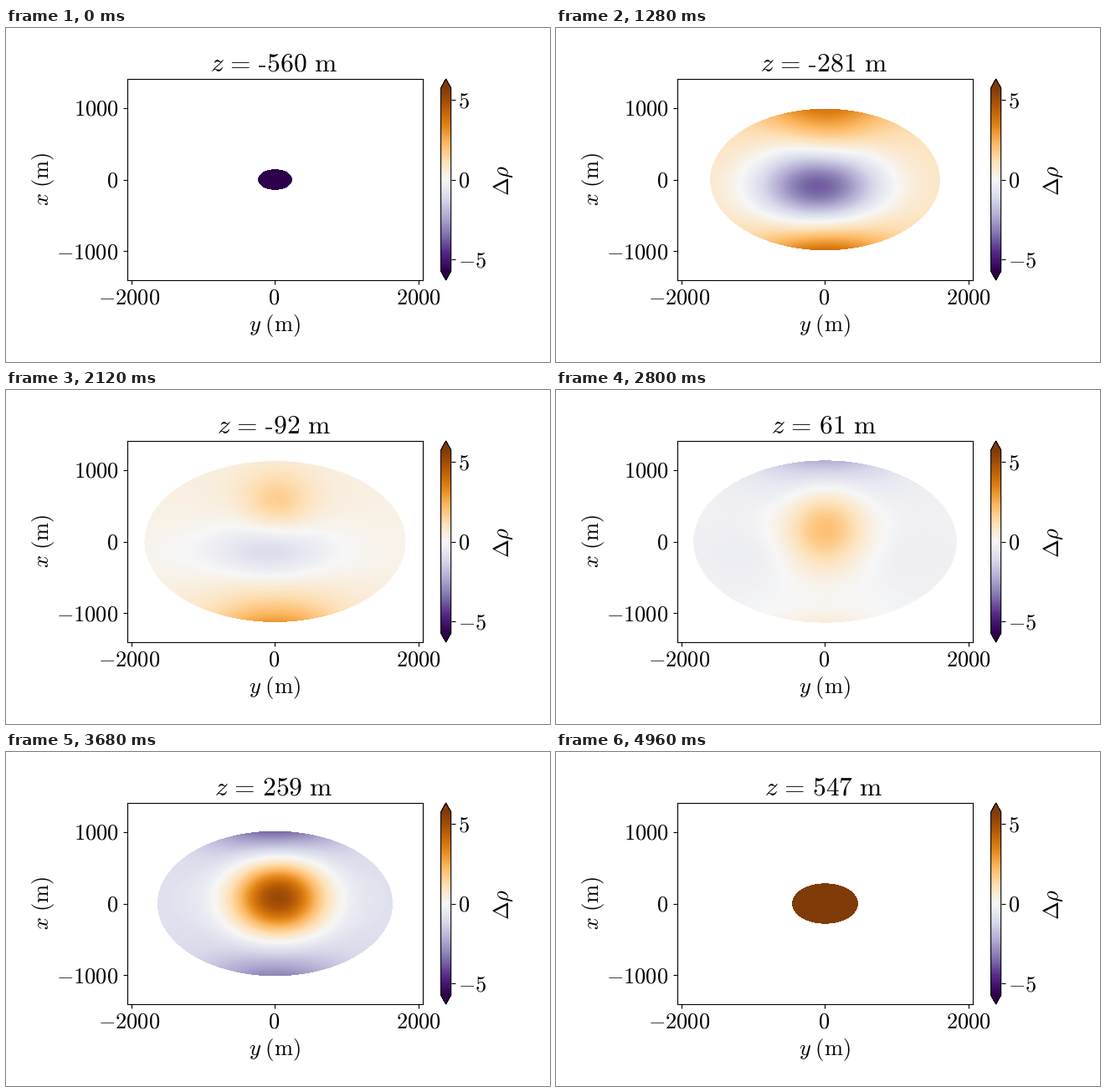
Animation of 650 by 400 pixels, one loop 5 s. Source, as a matplotlib script:

```python
import numpy as np
import matplotlib.pyplot as plt
from matplotlib.animation import FuncAnimation
from matplotlib.cm import ScalarMappable
from matplotlib.colors import Normalize

W, H = 650, 400
FRAMES, INTERVAL = 125, 40
VMAX = 5.74
BODY_SIZE, TITLE_SIZE = 19, 22.7

# Lengths in km: ellipsoid half axes and the shown range.
SEMI_Y, SEMI_X, SEMI_Z = 1.84, 1.138, 0.5645
LIM_Y, LIM_X = 2.054, 1.404

plt.rcParams["mathtext.fontset"] = "cm"


def cell_centres(limit, count):
    return (np.arange(count) + 0.5) / count * 2 * limit - limit


Y, X = np.meshgrid(cell_centres(LIM_Y, 352), cell_centres(LIM_X, 241))


def blob(y0, x0, width_y, width_x):
    return np.exp(-((Y - y0) / width_y) ** 2 - ((X - x0) / width_x) ** 2)


def density(z):
    """Density anomaly in the slice at height z, blank outside the ellipsoid."""
    core = (0.9 + 19.5 * z) * blob(0.25 * z - 0.02, 0.1 * np.tanh(5 * z),
                                   0.6 - 0.3 * z + 1.8 * z**2, 0.52 + 0.4 * z**2)
    caps = X**2 * np.exp(-Y**2) * (0.1 - 11 * z + (9 * z**2 - 1) * X)
    middle = np.exp(-((z + 0.09) / 0.2) ** 2) * (
        1.4 * blob(0.03, 0.5, 0.5, 0.45) - 0.6 * blob(-0.2, -0.15, 1.3, 0.35))
    rho = core + caps + middle - 3.2 * z
    inside = (Y / SEMI_Y) ** 2 + (X / SEMI_X) ** 2 + (z / SEMI_Z) ** 2 <= 1
    return np.where(inside, rho, np.nan)


fig = plt.figure(figsize=(W / 100, H / 100), dpi=100, facecolor="white")


def box(left, top, right, bottom):
    return fig.add_axes([left / W, 1 - bottom / H, (right - left) / W, (bottom - top) / H])


def label(x, y, tex, size=BODY_SIZE, ha="center", rotation=0):
    return fig.text(x / W, 1 - y / H, f"${tex}$", fontsize=size, ha=ha,
                    va="baseline", rotation=rotation, rotation_mode="anchor")


norm = Normalize(-VMAX, VMAX)
ax = box(145.2, 61, 497.7, 302)
image = ax.imshow(density(-0.56), cmap="PuOr_r", norm=norm, origin="lower",
                  extent=(-LIM_Y, LIM_Y, -LIM_X, LIM_X), aspect="auto",
                  interpolation="nearest")
ax.set_xticks([-2, 0, 2], [])
ax.set_yticks([-1, 0, 1], [])

cax = box(519.6, 61, 531.7, 302)
bar = fig.colorbar(ScalarMappable(norm, "PuOr_r"), cax=cax, extend="both")
bar.set_ticks([-5, 0, 5], labels=["", "", ""])

for step in (-1, 0, 1):
    shift = -1.5 if step < 0 else 0
    label(320.5 + 172 * step + shift, 330.4, 2000 * step)
    label(134.5, 190.6 - 86 * step, 1000 * step, ha="right")
    label(540.5, 190.6 - 95.5 * step, 5 * step, ha="left")
label(320.5, 363, r"y\hspace{0.3}\mathrm{(m)}")
label(51, 181.5, r"x\hspace{0.3}\mathrm{(m)}", rotation=90)
label(601, 182, r"\Delta\rho", rotation=90)

title = label(320, 52, "z", size=TITLE_SIZE)
hyphen = plt.Line2D([0, 0], [1 - 45.5 / H] * 2, color="black", lw=1.1,
                    solid_capstyle="butt", transform=fig.transFigure)
fig.add_artist(hyphen)


def update(k):
    z = -560 + 9 * max(k - 1, 0)
    image.set_data(density(z / 1000))
    # Math mode would turn the short hyphen into a minus, so leave room for a line.
    room = r"\hspace{0.38}" if z < 0 else ""
    title.set_text(rf"$z\hspace{{0.13}}=\hspace{{0.13}}{room}{abs(z)}\hspace{{0.33}}\mathrm{{m}}$")
    left = title.get_window_extent().x0
    hyphen.set_xdata([(left + 58.5) / W, (left + 66.5) / W])
    hyphen.set_visible(z < 0)
    return image, title, hyphen


anim = FuncAnimation(fig, update, frames=FRAMES, interval=INTERVAL,
                     repeat=True, repeat_delay=0, blit=False)
plt.show()
```
